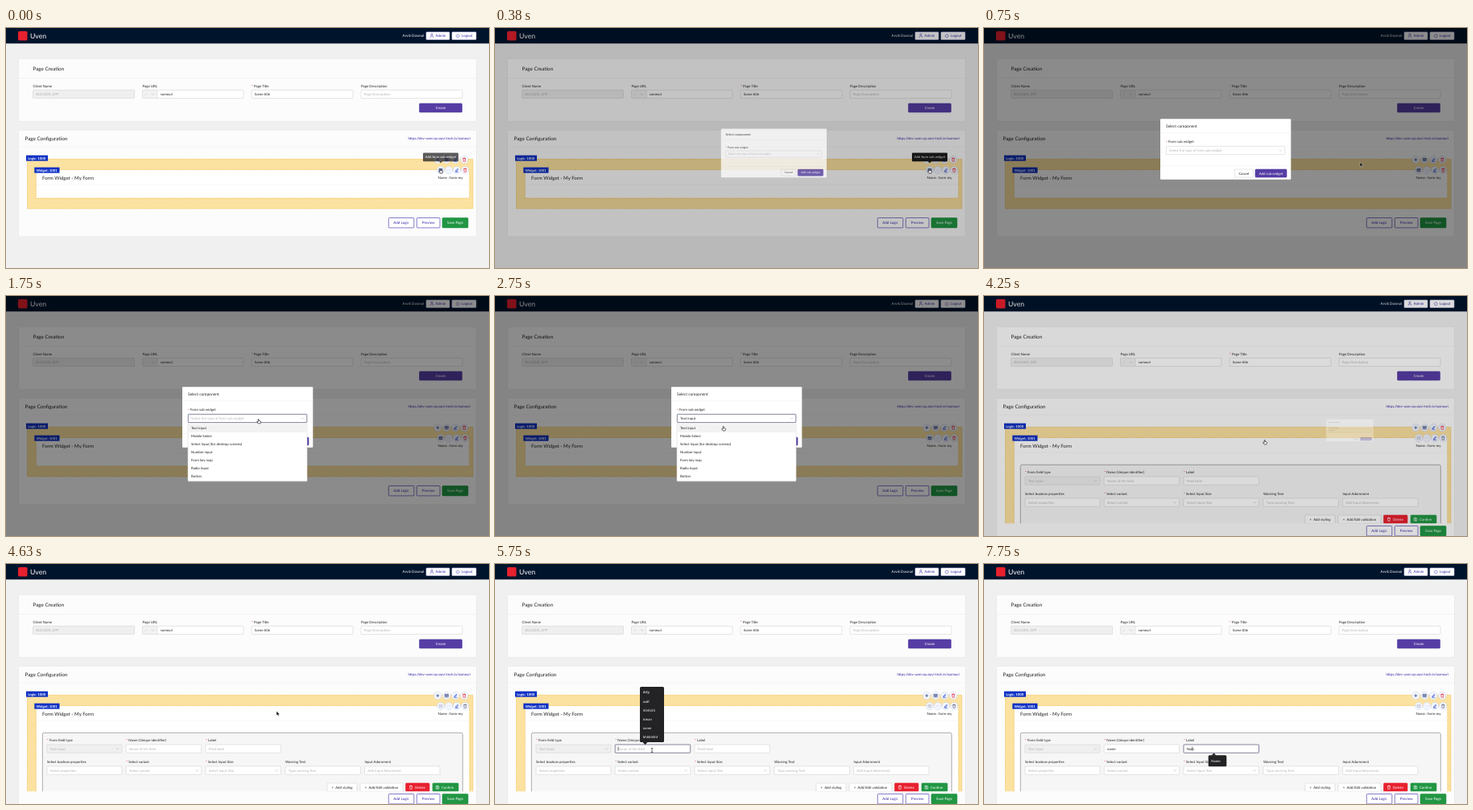
An HTML page that plays this animation: 600 px wide and 299 px high, repeating every 8 s.

```html
<!DOCTYPE html>
<html lang="en">
<head>
<meta charset="utf-8">
<title>Page builder</title>
<style>
html, body { margin: 0; width: 100%; height: 100%; overflow: hidden; background: #f0f0f0; }
svg { display: block; width: 100vw; height: 100vh; }
text { font-family: Lato, "Open Sans", sans-serif; text-rendering: geometricPrecision; white-space: pre; }
</style>
</head>
<body>
<svg id="stage" viewBox="0 0 600 299" preserveAspectRatio="none"></svg>
<script>
const LOOP = 8000, STEP = 125;
const INK = '#222', HINT = '#b4b4b4', LINE = '#d4d4d4', INDIGO = '#3328a8', PURPLE = '#563da4',
      RED = '#e8212e', GREEN = '#219643', BLUE = '#0b2fc4';
const OPTIONS = ['Text input', 'Mobile Select', 'Select Input (for desktop screens)',
  'Number input', 'Form key map', 'Radio Input', 'Button'];
const HISTORY = ['dsfg', 'asdf', '454545', 'isman', 'name', 'hhhhhhhf'];

// Pointer keys: time, x, y
const PATH = [[0, 540, 178], [500, 540, 178], [1125, 314, 153], [1750, 314, 156], [2375, 284, 165],
  [2875, 284, 165], [3625, 311, 176], [4000, 349, 182], [4500, 349, 182], [5125, 195, 232], [8000, 195, 232]];

const clamp = v => Math.max(0, Math.min(1, v));
const phase = (t, start, length) => clamp((t - start) / length);
const easeOut = p => 1 - (1 - p) ** 2;
const easeInOut = p => p < .5 ? 2 * p * p : 1 - 2 * (1 - p) ** 2;

// y is the vertical middle of the line of text
const text = (x, y, s, size = 4.35, fill = INK, extra = '') =>
  `<text x="${x}" y="${y + size * .35}" font-size="${size}" fill="${fill}" ${extra}>${s}</text>`;
const middle = (x, y, s, fill, size) => text(x, y, s, size, fill, 'text-anchor="middle"');
const right = (x, y, s, size, fill) => text(x, y, s, size, fill, 'text-anchor="end"');
const rect = (x, y, w, h, fill, stroke = 'none', r = 0, extra = '') =>
  `<rect x="${x}" y="${y}" width="${w}" height="${h}" rx="${r}" fill="${fill}" stroke="${stroke}" stroke-width=".6" ${extra}/>`;
const path = (d, stroke, width = .6, fill = 'none') =>
  `<path d="${d}" stroke="${stroke}" stroke-width="${width}" fill="${fill}"/>`;
const group = (attrs, s) => `<g ${attrs}>${s}</g>`;
const at = (x, y, s) => group(`transform="translate(${x} ${y})"`, s);
const chevron = (x, y) => path(`M${x - 1.6} ${y - .8}l1.6 1.6 1.6-1.6`, '#aaa', .5);

function label(x, y, s, required) {
  return required ? text(x, y + .4, '*', 4.35, RED) + text(x + 3, y, s) : text(x, y, s);
}

function input(x, y, w, { value = '', hint = '', disabled, focus, select, caret } = {}) {
  const shown = value || hint;
  const bar = 3.8 + value.length * 2.3;
  return rect(x, y, w, 10.3, disabled ? '#efefef' : '#fff', focus ? '#30345c' : LINE, .8)
    + text(x + 3.8, y + 5.3, shown, 4.35, value && !disabled ? INK : HINT)
    + (select ? chevron(x + w - 5.5, y + 5.3) : '')
    + (caret ? path(`M${x + bar} ${y + 2.5}v5.5`, '#000', .5) : '');
}

function button(x, y, w, h, s, fill, color, border = fill, size = 4.35) {
  return rect(x, y, w, h, fill, border, 1) + middle(x + w / 2, y + h / 2, s, color, size);
}

const GLYPHS = {
  plus: 'M-2 0h4M0-2v4',
  grid: 'M-2-1.7h4v3.4h-4zM-2-.4h4M0-.4v2.1',
  dots: 'M-1.8 0h.7M-.3 0h.7M1.2 0h.7',
  edit: 'M-1.6 1.1l2.6-2.8 .8.8-2.6 2.6zM-2 2.2h4',
  trash: 'M-2-1.4h4M-.7-1.4v-.7h1.4v.7M-1.4-1.4l.2 3.6h2.4l.2-3.6'
};
const icon = (x, y, name, color) => at(x, y,
  `<circle r="4.7" fill="#f3f6ff" stroke="#cdd3e4" stroke-width=".5"/>` + path(GLYPHS[name], color, .65));

function tag(x, y, w, s) {
  return rect(x, y, w, 7, BLUE) + text(x + 2.2, y + 3.5, s, 4.3, '#fff', 'font-weight="bold"');
}

function header() {
  return rect(0, 0, 600, 19.3, '#00142c')
    + rect(15, 4, 11.5, 11.5, RED, 'none', 1.5)
    + text(30, 9.8, 'Uven', 8.7, '#fff')
    + right(519, 9.8, 'Arvik Dosmal', 4.5, '#fff')
    + rect(522, 5, 29, 9.5, '#fff', '#c9c6ee', .8) + text(533.5, 9.8, 'Admin', 4.5, INDIGO)
    + path('M527 12q0-2.2 2-2.2t2 2.2M527.8 8.2a1.2 1.2 0 1 0 2.4 0a1.2 1.2 0 1 0-2.4 0', INDIGO, .5)
    + rect(554, 5, 30, 9.5, '#fff', '#c9c6ee', .8) + text(566, 9.8, 'Logout', 4.5, INDIGO)
    + path('M560 8.2a2 2 0 1 0 2.6 0M561.3 7.2v2.3', INDIGO, .5);
}

function creation() {
  return rect(15.5, 38.3, 569, 78, '#fcfcfc', '#e4e4e4', 1)
    + text(33.5, 51.2, 'Page Creation', 6.3)
    + path('M16 62.5H584', '#eee')
    + label(33.5, 72, 'Client Name') + input(33.5, 77.3, 126, { value: 'BUILDER_APP', disabled: true })
    + label(169.5, 72, 'Page URL') + rect(169.5, 77.3, 19, 10.3, '#f2f2f2', LINE, .8)
    + text(173, 82.5, '/', 4.35, HINT) + chevron(182.5, 82.5)
    + input(188, 77.3, 107, { value: 'someuri' })
    + label(305, 72, 'Page Title', true) + input(305, 77.3, 126, { value: 'Some title' })
    + label(441, 72, 'Page Description') + input(441, 77.3, 126, { hint: 'Page Description' })
    + button(513.5, 94, 53, 11, 'Create', PURPLE, '#fff');
}

function fieldPanel(t) {
  const name = 'name'.slice(0, t < 6000 ? 0 : 1 + Math.floor((t - 6000) / 250));
  const title = 'Nam'.slice(0, t < 7375 ? 0 : t < 7500 ? 1 : t < 7750 ? 2 : 3);
  const onName = t >= 5250 && t < 7000, onLabel = t >= 7000;
  return rect(45.3, 210.3, 522, 90, '#f6f6f6', '#777', 2)
    + label(51, 219.5, 'Form field type', true)
    + input(51, 225, 93, { value: 'Text input', disabled: true, select: true })
    + label(149.2, 219.5, 'Name (Unique identifier)', true)
    + input(149.2, 225, 93.5, { value: name, hint: 'Name of the field', focus: onName, caret: onName })
    + label(248, 219.5, 'Label', true)
    + input(248, 225, 93.5, { value: title, hint: 'Field label', focus: onLabel, caret: onLabel })
    + label(51, 246.2, 'Select boolean properties') + input(51, 252, 93, { hint: 'Select properties' })
    + label(149.2, 246.2, 'Select variant', true)
    + input(149.2, 252, 93.5, { hint: 'Select variant', select: true })
    + label(248, 246.2, 'Select Input Size', true)
    + input(248, 252, 93.5, { hint: 'Select Input Size', select: true })
    + label(347, 246.2, 'Warning Text') + input(347, 252, 93.5, { hint: 'Type warning Text' })
    + label(445.5, 246.2, 'Input Adornment') + input(445.5, 252, 93.5, { hint: 'Add Input Adornment' })
    + button(399, 273, 37, 10.4, '+  Add styling', '#fff', INK, LINE)
    + button(440, 273, 53, 10.4, '+  Add/Edit validation', '#fff', INK, LINE)
    + button(496.5, 273, 29.5, 10.4, '', RED) + text(508, 278.2, 'Delete', 4.35, '#fff')
    + at(503, 278.2, path(GLYPHS.trash, '#fff', .6))
    + button(530, 273, 32, 10.4, '', GREEN) + text(541, 278.2, 'Confirm', 4.35, '#fff')
    + at(536, 278.2, path('M-1.9-1.9h3l.8.8v3h-3.8zM-1-1.9v1.3h1.8v-1.3M-.7 1a.7.7 0 1 0 1.4 0a.7.7 0 1 0-1.4 0', '#fff', .5));
}

function configuration(t) {
  const open = t >= 4125, grow = open ? 80 : 0, dy = open ? 50 : 0;
  const ink = '#1b2f6b', pale = '#b9bfce';
  return rect(15.5, 127.3, 569, open ? 180 : 132.7, '#fcfcfc', '#e4e4e4', 1)
    + text(23.5, 137.5, 'Page Configuration', 6.3)
    + right(577, 137.5, 'https://dev-uven.np.navi-tech.in/someuri', 4.35, INDIGO)
    + path('M16 148H584', '#eee')
    + rect(26.5, 163.3, 553.5, 61.7 + grow, '#fce2a0', '#edb83d', 0, 'stroke-dasharray="2 .8"')
    + rect(37.3, 176.5, 538.5, 35.5 + grow, '#fff', '#edb83d', 0, 'stroke-dasharray="2 .8"')
    + path('M38 195H575', '#f0f0f0')
    + tag(25, 158.6, 27, 'Logic: 1000') + tag(35.3, 173.6, 31.2, 'Widget: 1001')
    + text(45, 186.7, 'Form Widget - My Form', 6.05)
    + right(567.5, 186.7, 'Name : form-my', 4.35)
    + icon(536.3, 164, 'plus', ink) + icon(547.3, 164, 'grid', ink)
    + icon(558.3, 164, 'edit', BLUE) + icon(569.3, 164, 'trash', RED)
    + icon(540, 177, 'grid', open ? pale : ink) + icon(550, 177, 'dots', pale)
    + icon(560, 177, 'edit', BLUE) + icon(570.3, 177, 'trash', open ? '#59617a' : RED)
    + (open ? fieldPanel(t) + rect(16, 283.3, 568, 16, '#fcfcfc') : '')
    + at(0, dy, button(475.3, 236.5, 31.5, 12.4, 'Add Logic', '#fff', INDIGO, INDIGO, 4.5)
      + button(510.3, 236.5, 28.7, 12.4, 'Preview', '#fff', INDIGO, INDIGO, 4.5)
      + button(542, 236.5, 32, 12.4, 'Save Page', GREEN, '#fff', GREEN, 4.5));
}

function tooltip(t) {
  const alpha = t < 125 ? .72 : 1 - phase(t, 500, 250);
  return alpha ? group(`opacity="${alpha}"`,
    rect(518, 155.5, 44, 10.8, '#1c1c1e', 'none', 1) + path('M537.8 166l2.2 2.2 2.2-2.2z', 'none', 0, '#1c1c1e')
    + middle(540, 161, 'Add form sub widget', '#fff', 4.2)) : '';
}

function dialog(t) {
  if (t < 250 || t > 4320) return '';
  const enter = phase(t, 250, 245), leave = phase(t, 4105, 212);
  const size = .2 + .8 * easeOut(enter) * (1 - easeInOut(leave));
  const alpha = easeOut(enter) * (1 - leave);
  const picked = t >= 2750;
  const body = rect(219, 113.3, 162.3, 75.4, '#fff', 'none', 1)
    + text(226, 122, 'Select component', 4.9)
    + path('M219 130.5H381.3M219 171.5H381.3', '#ececec', .5)
    + label(226, 141.8, 'Form sub widget', true)
    + input(226.3, 147.3, 147.5, { value: picked ? OPTIONS[0] : '', hint: 'Select the type of form sub widget',
      focus: t >= 1250, select: true })
    + button(311.3, 176, 23, 10, 'Cancel', '#fff', INK, LINE)
    + button(337, 176, 39, 10, 'Add sub widget', PURPLE, '#fff');
  return rect(0, 0, 600, 299, '#000', 'none', 0, `opacity="${.45 * enter * (1 - leave)}"`)
    + group(`opacity="${alpha}" transform="translate(541 176.5) scale(${size}) translate(-541 -176.5)"`, body)
    + dropdown(t);
}

function dropdown(t) {
  const alpha = phase(t, 1250, 250) * (1 - phase(t, 2750, 250));
  if (!alpha) return '';
  return group(`opacity="${alpha}"`, rect(226, 158.8, 148, 72, '#fff', '#d8d8d8', .8)
    + rect(226.3, 160, 147.4, 9.8, '#f2f2f2')
    + OPTIONS.map((s, i) => text(230, 164.6 + i * 10, s)).join(''));
}

function suggestions(t) {
  const dark = '#232326';
  if (t >= 5375 && t < 6000)
    return rect(180, 153, 30, 69, dark, 'none', 1.5) + path('M183.5 222h6l-3 3.2z', 'none', 0, dark)
      + HISTORY.map((s, i) => text(183.8, 159.8 + i * 11.2, s, 4.35, '#fff')).join('')
      + rect(182, 217, 26, 4, dark);
  const x = t >= 6000 && t < 6750 ? 180 : t >= 7375 ? 278.7 : 0;
  return x ? rect(x, 238.3, 22.6, 14, dark, 'none', 1.5) + path(`M${x + 3.8} 238.5l3-3 3 3z`, 'none', 0, dark)
    + text(x + 3.6, 245.5, x < 200 ? 'name' : 'Name', 4.35, '#fff') : '';
}

function pointer(t) {
  if (t >= 6000) return '';
  const i = PATH.findIndex((k, n) => n && t <= k[0]), [t0, x0, y0] = PATH[i - 1], [t1, x1, y1] = PATH[i];
  const p = easeInOut(phase(t, t0, t1 - t0));
  const arrow = (t > 500 && t < 1000) || (t > 2875 && t < 3875) || (t > 4500 && t < 5000);
  const shape = t >= 5000 ? path('M-1.2-2.6q1.2 0 1.2.7v3.8q0 .7-1.2.7M1.2-2.6q-1.2 0-1.2.7M0 1.9q0 .7 1.2.7', '#000', .6)
    : arrow ? path('M-.6-2.6v5.4l1.3-1.2 .8 1.9 .9-.4-.8-1.8h1.7z', '#fff', .35, '#000')
    : path('M-.8-2.4q.7-.5 1 .2v1.6l2 .6q.6.4.2 1.5l-.6 1.4h-2.6l-1.6-2.2q.2-.8 1.6 0z', '#000', .6, '#fff');
  return at(x0 + (x1 - x0) * p, y0 + (y1 - y0) * p, shape);
}

const stage = document.getElementById('stage');
let last = -1;
function tick(now) {
  const t = Math.floor((now % LOOP + 6) / STEP) * STEP % LOOP;
  if (t !== last) {
    last = t;
    stage.innerHTML = rect(0, 0, 600, 299, '#f0f0f0') + header() + creation() + configuration(t)
      + tooltip(t) + dialog(t) + suggestions(t) + pointer(t);
  }
  requestAnimationFrame(tick);
}
tick(0);
</script>
</body>
</html>
```
